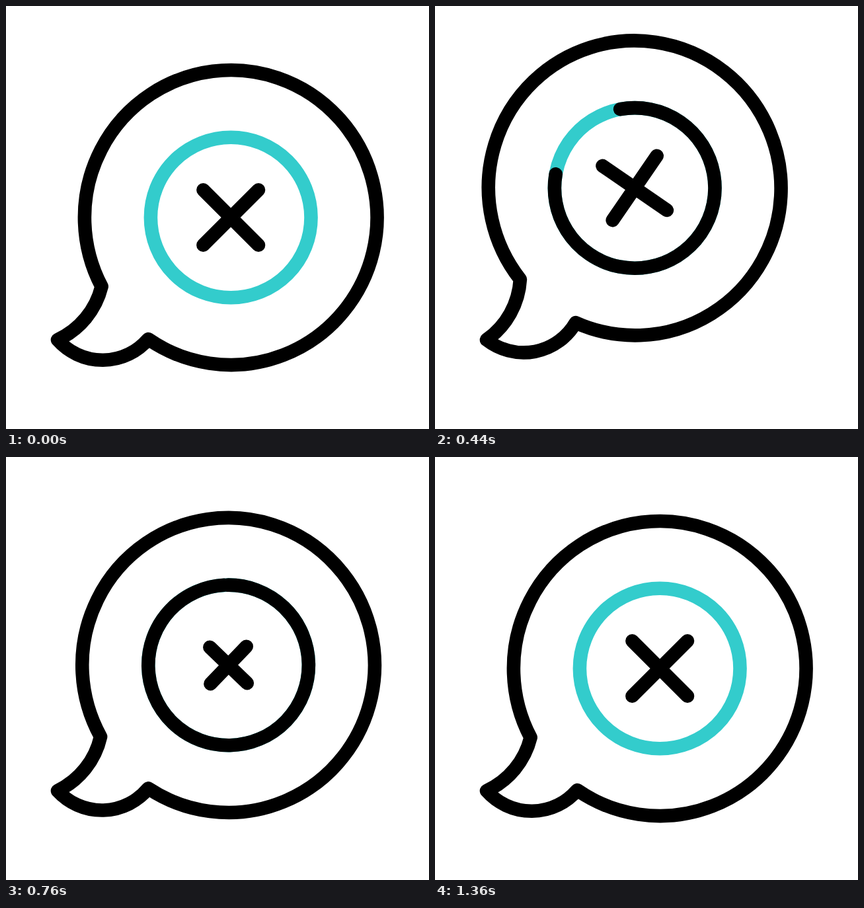
An HTML page for the animation above (1.48 s loop, 640 by 640 pixels).

```html
<!DOCTYPE html>
<html lang="en">
<head>
<meta charset="utf-8">
<title>Speech bubble with cross</title>
<style>
  html, body { margin: 0; height: 100%; overflow: hidden; background: #fff; }
  svg { display: block; width: 100vw; height: 100vh; }
  g { fill: none; stroke: #000; stroke-width: 20.6; stroke-linecap: round; stroke-linejoin: round; }
</style>
</head>
<body>
<svg viewBox="0 0 640 640">
  <g id="bubble">
    <path d="M144.66 424.41A120 120 0 0 1 78 505A91 91 0 0 0 215.29 504.08A221.3 223 0 1 0 144.66 424.41Z"/>
    <g transform="translate(340.2 320)">
      <circle r="121.3" stroke="#3cc"/>
      <circle id="arc" r="121.3" pathLength="1" transform="rotate(-90)"/>
      <path id="cross"/>
    </g>
  </g>
</svg>
<script>
const LOOP = 1480, STEP = 40;
const [bubble, arc, cross] = ['bubble', 'arc', 'cross'].map(id => document.getElementById(id));

// [time in ms, degrees] of the swing around the tail tip
const swing = [[0, 0], [275, 9.1], [422, -11.1], [570, 4.2], [720, -1.2], [960, 0]];

const clamp = x => Math.min(1, Math.max(0, x));
const smooth = x => x * x * (3 - 2 * x);
const progress = (t, from, to) => clamp((t - from) / (to - from));

function swingAt(t) {
  const i = swing.findIndex(key => key[0] > t);
  if (i < 0) return 0;
  const [t0, a] = swing[i - 1], [t1, b] = swing[i];
  return a + (b - a) * smooth(progress(t, t0, t1));
}

// cubic-bezier(x1, 0, x2, 1), solved by bisection
function bezierEase(x, x1, x2) {
  let lo = 0, hi = 1;
  for (let i = 0; i < 24; i++) {
    const s = (lo + hi) / 2, r = 1 - s;
    if (3 * r * r * s * x1 + 3 * r * s * s * x2 + s ** 3 < x) lo = s;
    else hi = s;
  }
  return smooth(lo);
}

function draw(t) {
  bubble.setAttribute('transform', `rotate(${swingAt(t)} 78 505)`);

  const drawn = bezierEase(progress(t, 0, 840), 0.333, 0.22);
  arc.setAttribute('stroke-dasharray', `${drawn} 2`);
  arc.setAttribute('opacity', t > 0 ? 1 - smooth(progress(t, 1165, 1360)) : 0);

  const pulse = Math.sin(Math.PI * progress(t, 575, 1120)) ** 2;
  const k = 41.8 * (1 - 0.44 * pulse);
  cross.setAttribute('d', `M${-k} ${-k}L${k} ${k}M${k} ${-k}L${-k} ${k}`);
}

const start = performance.now();
function tick() {
  const t = (performance.now() - start) % LOOP;
  draw(Math.floor(t / STEP) * STEP);
  requestAnimationFrame(tick);
}
tick();
</script>
</body>
</html>
```
